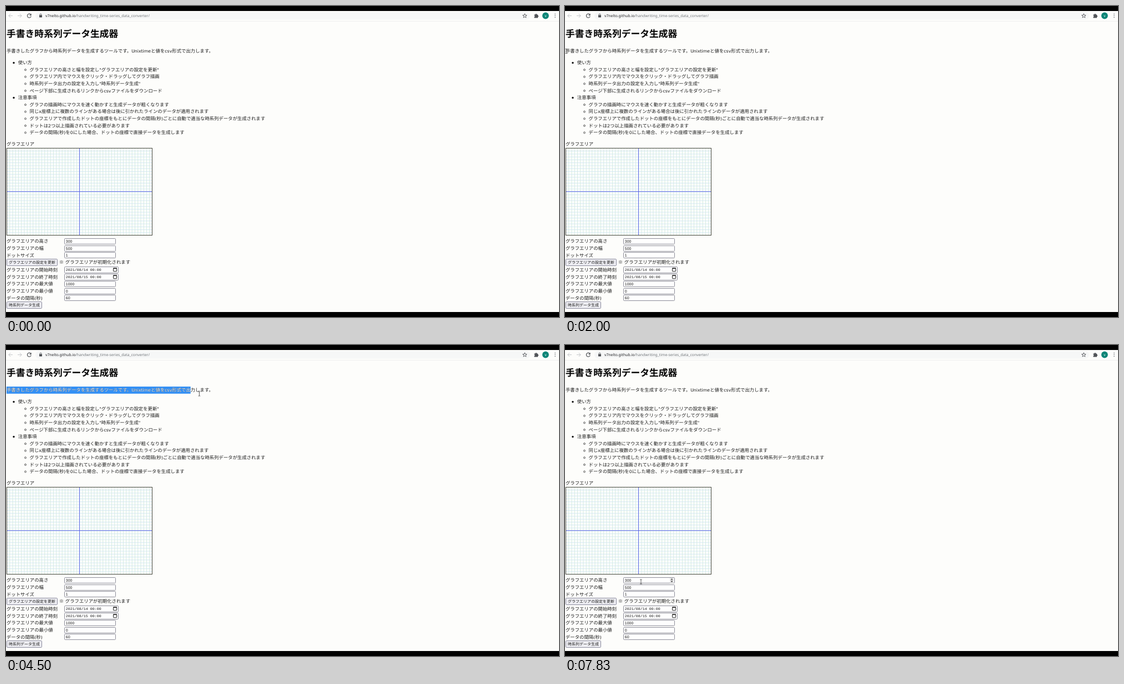
These frames come from a looping animation (997 px wide and 561 px high, 8 s). An HTML page:

```html
<!DOCTYPE html>
<html lang="ja">
<head>
<meta charset="utf-8">
<title>手書き時系列データ生成器</title>
<style>
  html, body { margin: 0; width: 100%; height: 100%; overflow: hidden; background: #000; }
  svg { display: block; width: 100vw; height: 100vh; }
  text { font: 8.4px "Noto Sans CJK JP", sans-serif; fill: #1c1c1c; white-space: pre; text-rendering: geometricPrecision; }
  .latin { font: .93em "DejaVu Sans", sans-serif; }
  .title { font-size: 16.8px; font-weight: 700; fill: #000; }
  .url { font: 6.82px "Noto Sans", sans-serif; fill: #202124; }
  .path { fill: #74787c; }
  .value { font: 7px "Liberation Sans", Arial, sans-serif; }
  .date { font: 6.67px "Liberation Mono", monospace; }
  .button { font-size: 7px; }
  .avatar { font: 6.5px Roboto, sans-serif; fill: #fff; text-anchor: middle; }
  .selected { fill: #fff; }
</style>
</head>
<body>
<svg viewBox="0 0 997 561" preserveAspectRatio="none">
  <defs>
    <clipPath id="selectionClip"><rect id="selectionEdge" x="1" y="74" height="15" width="0"/></clipPath>
  </defs>
  <rect width="997" height="561"/>
  <rect y="9" width="997" height="543" fill="#fdfdfb"/>

  <g id="toolbar" fill="none" stroke-width="1">
    <path d="M0 27.5H997" stroke="#efefee"/>
    <rect x="53" y="10.8" width="892" height="13.6" rx="6.8" fill="#f6f7f7"/>
    <path d="M12 17.6H5M8.2 14.2L4.8 17.6L8.2 21M21 17.6H28M24.8 14.2L28.2 17.6L24.8 21" stroke="#c3c5c8"/>
    <path d="M44.6 15.3A3.5 3.5 0 1 0 45.3 18.6" stroke="#505357" stroke-width="1.2"/>
    <path d="M45.7 13.6V17.2H42.1Z" fill="#505357"/>
    <rect x="60" y="16.6" width="5" height="4" rx=".5" fill="#4a4d51"/>
    <path d="M61 17V15.6A1.5 1.5 0 0 1 64 15.6V17" stroke="#4a4d51" stroke-width=".8"/>
    <path id="star" stroke="#505357" stroke-width=".9" stroke-linejoin="round"/>
    <path d="M952.4 15.4H954.4A1.3 1.3 0 1 1 957 15.4H959V17.2A1.2 1.2 0 1 1 959 19.6V21.4H952.4V19.4A1.1 1.1 0 1 0 952.4 17.2Z" fill="#505357"/>
    <circle cx="972.8" cy="17.5" r="5.9" fill="#0b8577"/>
    <path d="M990 14.6V21.5" stroke="#505357" stroke-width="1.5" stroke-linecap="round" stroke-dasharray="0 2.9"/>
  </g>
  <text class="url" x="71" y="20">v7nelto.github.io<tspan class="path">/handwriting_time-series_data_converter/</tspan></text>
  <text class="avatar" x="972.8" y="19.6">v</text>

  <g id="page"></g>
  <rect id="selection" x="1" y="75" height="12.8" width="0" fill="#3390f5"/>
  <text id="intro" x="1" y="84.2"></text>
  <g clip-path="url(#selectionClip)"><text id="introSelected" class="selected" x="1" y="84.2"></text></g>

  <g id="spinner" fill="#444">
    <rect x="188.8" y="420" width="7.4" height="9.4" fill="#ececec"/>
    <path d="M190.3 423.6L192.5 421.2L194.7 423.6ZM190.3 425.6L192.5 428L194.7 425.6Z"/>
  </g>
  <path id="arrow" d="M0 0V8.4L2 6.6L3.5 9.8L4.8 9.2L3.4 6.1H6Z" fill="#fff" stroke="#3c3c44" stroke-width=".8"/>
  <path id="beam" d="M-1.8 -4H-.4L0 -3.6L.4 -4H1.8M0 -3.6V3.6M-1.8 4H-.4L0 3.6L.4 4H1.8" fill="none" stroke="#333" stroke-width=".8"/>
</svg>
<script>
const $ = id => document.getElementById(id);
const page = $('page');

function create(tag, attrs) {
  const node = document.createElementNS('http://www.w3.org/2000/svg', tag);
  for (const name in attrs) node.setAttribute(name, attrs[name]);
  return node;
}
const add = (tag, attrs) => page.appendChild(create(tag, attrs));

// Sets Latin runs in their own face, Japanese in the base one.
function setMixedText(node, content) {
  for (const run of content.split(/([!-~]+)/)) {
    const latin = /^[!-~]/.test(run);
    const span = node.appendChild(create('tspan', latin ? { class: 'latin' } : {}));
    span.textContent = run;
  }
}
const label = (x, y, content) => setMixedText(add('text', { x, y }), content);
const plain = (x, y, content, kind) => { add('text', { x, y, class: kind }).textContent = content; };
const line = (d, stroke, width = 1) => add('path', { d, stroke, 'stroke-width': width, fill: 'none' });
const box = (x, y, width, height, fill, stroke, rx = 1) =>
  add('rect', { x, y, width, height, fill, stroke, rx });

plain(1, 56.2, '手書き時系列データ生成器', 'title');

// A leading dash marks a nested item.
[
  '使い方',
  '-グラフエリアの高さと幅を設定し"グラフエリアの設定を更新"',
  '-グラフエリア内でマウスをクリック・ドラッグしてグラフ描画',
  '-時系列データ出力の設定を入力し"時系列データ生成"',
  '-ページ下部に生成されるリンクからcsvファイルをダウンロード',
  '注意事項',
  '-グラフの描画時にマウスを速く動かすと生成データが粗くなります',
  '-同じx座標上に複数のラインがある場合は後に引かれたラインのデータが適用されます',
  '-グラフエリアで作成したドットの座標をもとにデータの間隔(秒)ごとに自動で適当な時系列データが生成されます',
  '-ドットは2つ以上描画されている必要があります',
  '-データの間隔(秒)を0にした場合、ドットの座標で直接データを生成します'
].forEach((item, i) => {
  const nested = item[0] === '-';
  const y = 102 + i * 12.6;
  label(nested ? 42.6 : 21.8, y + 3.2, item.slice(nested ? 1 : 0));
  add('circle', {
    cx: nested ? 35 : 14, cy: y + 0.5, r: nested ? 1.5 : 1.7,
    fill: nested ? 'none' : '#111', stroke: nested ? '#333' : 'none', 'stroke-width': 0.8
  });
});

function drawGraph() {
  const left = 1.5, top = 256.5, width = 262, height = 157, gap = 5.25;
  const right = left + width, bottom = top + height;
  box(left, top, width, height, '#fcfefd', 'none', 0);
  let columns = '', rows = '';
  for (let x = left + gap; x < right - 1; x += gap) columns += `M${x} ${top}V${bottom}`;
  for (let y = top + gap; y < bottom - 1; y += gap) rows += `M${left} ${y}H${right}`;
  line(columns, '#cfe9d6', 0.8);
  line(rows, '#cfe5f3', 0.8);
  line(`M132.5 ${top}V${bottom}M${left} 334.7H${right}`, '#5b66e6');
  box(left, top, width, height, 'none', '#45473c', 0);
}
label(1, 252, 'グラフエリア');
drawGraph();

function field(y, name, value, isDate) {
  label(1, y + 3, name);
  box(105.5, Math.round(y - 5.2) + 0.5, isDate ? 97 : 92, isDate ? 11 : 10, '#fff', '#8c8c98');
  plain(107.8, y + 2.8, value, isDate ? 'date' : 'value');
  if (!isDate) return;
  box(193.6, y - 2.4, 6, 5.6, 'none', '#222', 0.5);
  line(`M193.2 ${y - 2.2}H200M194.9 ${y - 3.6}v1M198.3 ${y - 3.6}v1`, '#222', 1.2);
}
function button(y, width, caption) {
  box(1.5, Math.round(y - 6) - 0.5, width, 12, '#ededf2', '#8a8a9c', 1.2);
  plain(5, y + 2.7, caption, 'button');
}
field(424.3, 'グラフエリアの高さ', '300');
field(436.9, 'グラフエリアの幅', '500');
field(449.5, 'ドットサイズ', '1');
button(462.6, 91, 'グラフエリアの設定を更新');
label(95.8, 465, '※');
label(106.8, 465, 'グラフエリアが初期化されます');
field(475.5, 'グラフエリアの開始時刻', '2021/08/14 00:00', true);
field(488.5, 'グラフエリアの終了時刻', '2021/08/15 00:00', true);
field(501.3, 'グラフエリアの最大値', '1000');
field(513.9, 'グラフエリアの最小値', '0');
field(526.5, 'データの間隔(秒)', '60');
button(539.5, 63, '時系列データ生成');

const starPoints = Array.from({ length: 10 }, (_, i) => {
  const angle = i * Math.PI / 5, radius = i % 2 ? 1.7 : 4;
  return [935.3 + radius * Math.sin(angle), 17.8 - radius * Math.cos(angle)];
});
$('star').setAttribute('d', `M${starPoints.join('L')}Z`);

const LOOP = 8000, FPS = 6;
const intro = $('intro');
for (const node of [intro, $('introSelected')]) {
  setMixedText(node, '手書きしたグラフから時系列データを生成するツールです。Unixtimeと値をcsv形式で出力します。');
}

// Pointer path: time in ms, x, y.
const path = [
  [1166, -3, 108], [1333, -1, 104], [1833, 2, 82], [2400, 3, 80],
  [3000, 96, 79], [4500, 348.5, 88], [4833, 390, 100], [5333, 412, 128],
  [5833, 415, 131], [6000, 415, 131], [6500, 325, 339],
  [7167, 170, 420], [7833, 137, 427], [8000, 137, 427]
];

function pointerAt(t) {
  const i = Math.max(1, path.findIndex(point => point[0] >= t));
  const [t0, x0, y0] = path[i - 1], [t1, x1, y1] = path[i];
  const k = (t - t0) / (t1 - t0);
  return [x0 + (x1 - x0) * k, y0 + (y1 - y0) * k];
}

function selectedWidth(t, x) {
  if (t < 2400 || t >= 6100) return 0;
  const total = intro.getComputedTextLength();
  if (t >= 4800) return total;
  let width = 0;
  for (let n = 1; n <= intro.getNumberOfChars(); n++) {
    const next = intro.getSubStringLength(0, n);
    if (next > x - 11) break;
    width = next;
  }
  return width;
}

const show = (node, visible) => node.setAttribute('visibility', visible ? 'visible' : 'hidden');

function render() {
  const now = performance.now() % LOOP;
  // The picture advances in whole steps of a sixth of a second.
  const t = Math.floor((now + 4) * FPS / 1000) * 1000 / FPS % LOOP;
  const [x, y] = pointerAt(t);
  const present = t > 1160;
  const overField = x > 105 && x < 198 && y > 419 && y < 431;
  const overText = x < 377 && y > 74 && y < 90;
  const beam = overField || overText;
  for (const id of ['arrow', 'beam']) {
    $(id).setAttribute('transform', `translate(${x} ${y})`);
    show($(id), present && beam === (id === 'beam'));
  }
  show($('spinner'), present && overField);
  const width = selectedWidth(t, x);
  $('selection').setAttribute('width', width);
  $('selectionEdge').setAttribute('width', width);
  requestAnimationFrame(render);
}
render();
</script>
</body>
</html>
```
